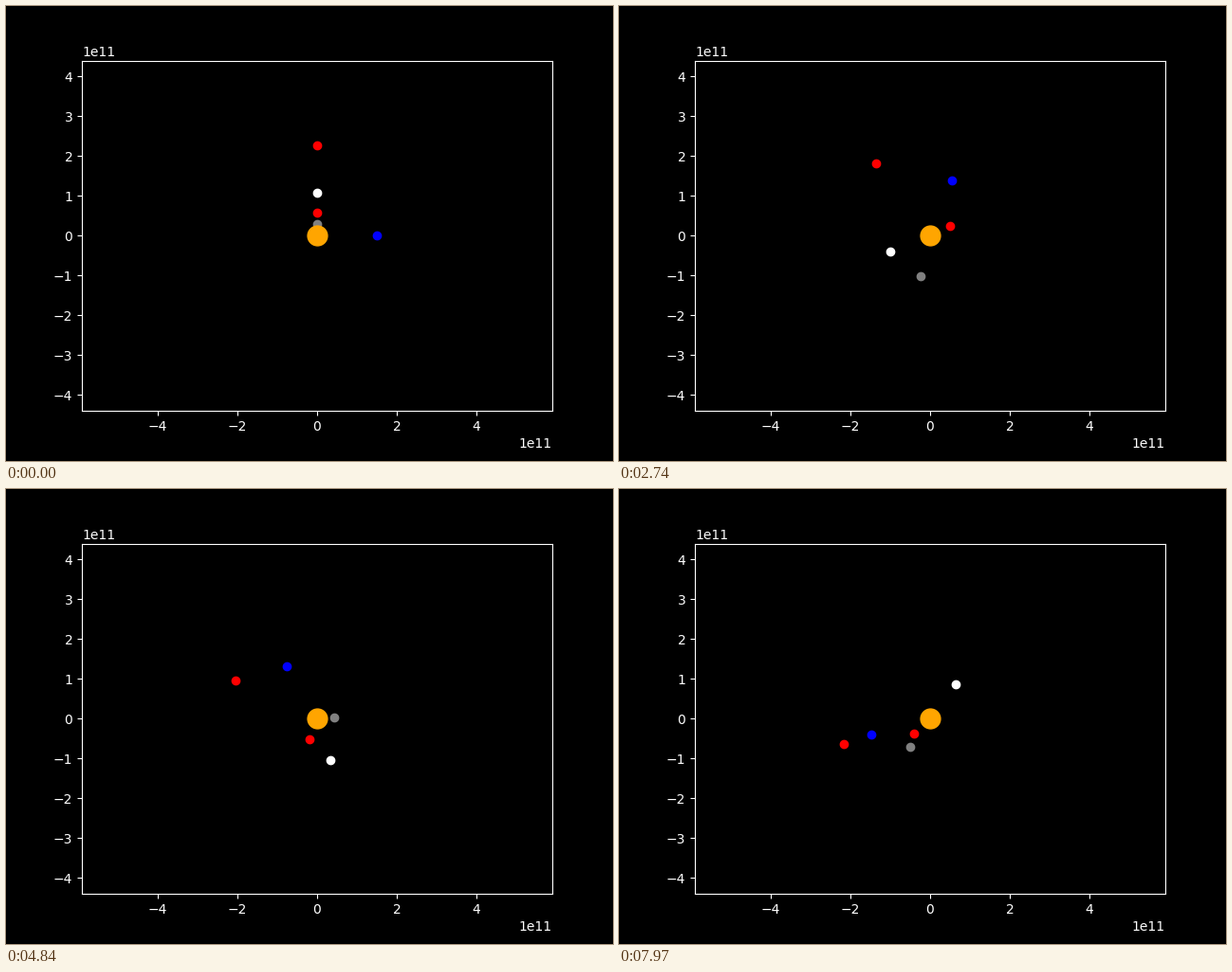
Animation, 640 px wide and 480 px high, one loop 7.99 s. Source, as a matplotlib script:

```python
import numpy as np
import matplotlib.pyplot as plt
from matplotlib.animation import FuncAnimation
from matplotlib.markers import TICKDOWN, TICKLEFT

W, H, DPI = 640, 480, 100
YMAX = 4.4                          # axis limits in units of 1e11 m
XMAX = YMAX * 496 / 369.6
PAD = 7                             # tick length plus label gap, points

plt.rcParams.update({"font.family": "DejaVu Sans", "font.size": 10,
                     "text.color": "white"})

# colour, semi-major axis, eccentricity (negative: starts at the far end),
# mean motion in degrees per step, starting direction in degrees
BODIES = [
    ("gray", 0.688, 0.57, -360 / 226, 90),
    ("red", 0.5627, -0.0155, 2.15, 90),
    ("white", 1.08, 0.0, 0.8167, 90),
    ("blue", 1.507, 0.0095, 0.492, 0),
    ("red", 2.267, 0.0, 0.2682, 90),
]

# Each step lasts two ticks of 10 ms; a few are held and swallow the next one.
HOLDS = (293, 335, 377)
STEPS = []
for s in range(398):
    if s - 1 not in HOLDS:
        STEPS += [s] * (5 if s in HOLDS else 2)


def position(a, e, rate, start, step):
    """Point on a Kepler orbit after the given number of steps."""
    mean = np.radians(rate * step)
    ecc = mean
    for _ in range(60):
        ecc -= (ecc - e * np.sin(ecc) - mean) / (1 - e * np.cos(ecc))
    along = a * (np.cos(ecc) - e)
    across = a * np.sqrt(1 - e * e) * np.sin(ecc)
    c, s = np.cos(np.radians(start)), np.sin(np.radians(start))
    return along * c - across * s, along * s + across * c


def number(n):
    return str(n).replace("-", "\u2212")


def label(text, xy, offset, ha, va):
    return ax.annotate(text, xy, xytext=offset, textcoords="offset points",
                       ha=ha, va=va, annotation_clip=False)


def ticks(xs, ys, marker):
    ax.plot(xs, ys, ls="none", marker=marker, ms=3.5, mew=0.8,
            color="white", clip_on=False)


fig = plt.figure(figsize=(W / DPI, H / DPI), dpi=DPI, facecolor="black")
ax = fig.add_axes([0.125, 0.11, 0.775, 0.77])
ax.set_xlim(-XMAX, XMAX)
ax.set_ylim(-YMAX, YMAX)
ax.set_axis_off()

# frame, ticks and labels
for x in (-XMAX, XMAX):
    ax.plot([x, x], [-YMAX, YMAX], color="white", lw=0.8, clip_on=False)
for y in (-YMAX, YMAX):
    ax.plot([-XMAX, XMAX], [y, y], color="white", lw=0.8, clip_on=False)

xticks = range(-4, 5, 2)
yticks = range(-4, 5)
ticks(xticks, [-YMAX] * len(xticks), TICKDOWN)
ticks([-XMAX] * len(yticks), yticks, TICKLEFT)
for n in xticks:
    xlab = label(number(n), (n, -YMAX), (0, -PAD), "center", "top")
for n in yticks:
    label(number(n), (-XMAX, n), (-PAD, 0), "right", "center_baseline")

label("1e11", (-XMAX, YMAX), (0, 3), "left", "baseline")
below = xlab.get_window_extent().ymin - 3 * DPI / 72
fig.text(0.9, below / H, "1e11", ha="right", va="top")

dots = [ax.plot([], [], "o", color=body[0], ms=6, zorder=3)[0]
        for body in BODIES]
ax.plot([0], [0], "o", color="orange", ms=15, zorder=4)


def update(i):
    for dot, (_, a, e, rate, start) in zip(dots, BODIES):
        x, y = position(a, e, rate, start, STEPS[i])
        dot.set_data([x], [y])
    return dots


anim = FuncAnimation(fig, update, frames=len(STEPS), interval=10,
                     repeat=True, repeat_delay=0, blit=False)
plt.show()
```
